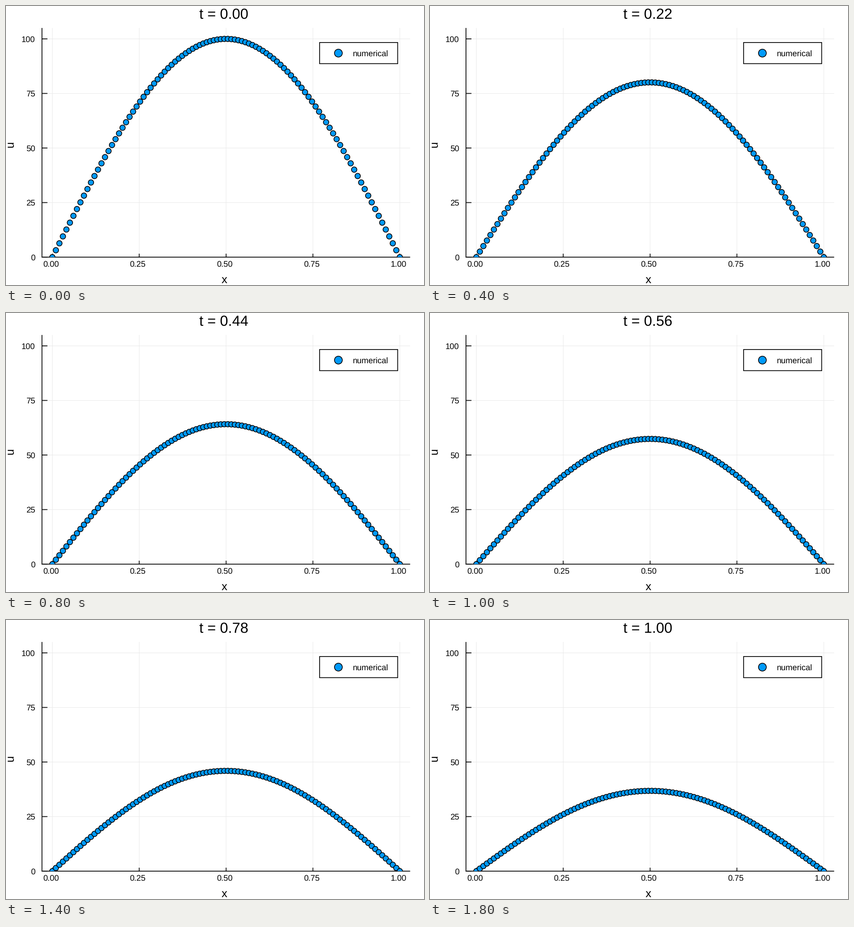
Animation, 917 px wide and 611 px high, one loop 2 s. Source, as a matplotlib script:

```python
import numpy as np
import matplotlib.pyplot as plt
from matplotlib.animation import FuncAnimation
from matplotlib.patches import Circle, Rectangle

W, H, DPI = 917, 611, 100
PT = 72 / DPI                      # points per pixel
LEFT, RIGHT, TOP, BOTTOM = 78.9, 886.6, 48.1, 550.0
BLUE, GRID = "#009afa", "#e9e9e9"
FRAMES, INTERVAL = 10, 200

plt.rcParams.update({
    "font.family": "Liberation Sans",
    "text.hinting": "none",
    "text.kerning_factor": 20,     # digits keep an even advance
})

fig = plt.figure(figsize=(W / DPI, H / DPI), dpi=DPI, facecolor="white")
ax = fig.add_axes([0, 0, 1, 1])
ax.set_xlim(0, W)
ax.set_ylim(H, 0)
ax.axis("off")


def px(x):
    return 101.7 + 762.2 * x


def py(u):
    return BOTTOM - 4.78 * u


def line(xs, ys, color="black", width=1.7, z=2):
    ax.plot(xs, ys, color=color, lw=width * PT, zorder=z, snap=False,
            solid_capstyle="butt")


def label(x, y, text, size=18, **kw):
    return ax.text(x, y, text, fontsize=size * PT, va="baseline", **kw)


def dot(x, y, radius):
    return ax.add_patch(Circle((x, y), radius, fc=BLUE, ec="black",
                               lw=1.6 * PT, zorder=5))


# Grid, ticks and tick labels
for x in np.linspace(0, 1, 5):
    line([px(x)] * 2, [TOP, BOTTOM], GRID, 1, 1)
    line([px(x)] * 2, [BOTTOM, BOTTOM - 7.5])
    label(px(x) - 20.5, 570.7, f"{x:.2f}")
for u in range(0, 101, 25):
    line([LEFT, RIGHT], [py(u)] * 2, GRID, 1, 1)
    line([LEFT, LEFT + 12], [py(u)] * 2)
    label(64 - 10 * len(str(u)), py(u) + 6.6, str(u))

line([LEFT, LEFT], [TOP, BOTTOM + 0.85])
line([LEFT - 0.85, RIGHT], [BOTTOM, BOTTOM])
label(479, 607, "x", 25, ha="center")
label(21, 303, "u", 25, rotation=90, ha="right").set_va("center")
title = label(424, 27.5, "", 32)

# Legend
ax.add_patch(Rectangle((688, 80), 171.3, 46.3, fc="white", ec="black",
                       lw=1.7 * PT, zorder=6, snap=False))
dot(729.2, 103.2, 8.6).set_zorder(7)
label(761, 110, "numerical", zorder=7)

# Heat profile sampled at evenly spaced points
xs = np.linspace(0, 1, 100)
window = Rectangle((LEFT, TOP), RIGHT - LEFT, BOTTOM - TOP,
                   transform=ax.transData)
dots = [dot(px(x), BOTTOM, 5.9) for x in xs]
for d in dots:
    d.set_clip_path(window)


def update(i):
    t = i / (FRAMES - 1)
    title.set_text(f"t = {t:.2f}")
    for d, x, u in zip(dots, xs, 100 * np.sin(np.pi * xs) * np.exp(-t)):
        d.center = px(x), py(u)
    return [title, *dots]


anim = FuncAnimation(fig, update, frames=FRAMES, interval=INTERVAL,
                     repeat=True, repeat_delay=0)
plt.show()
```
